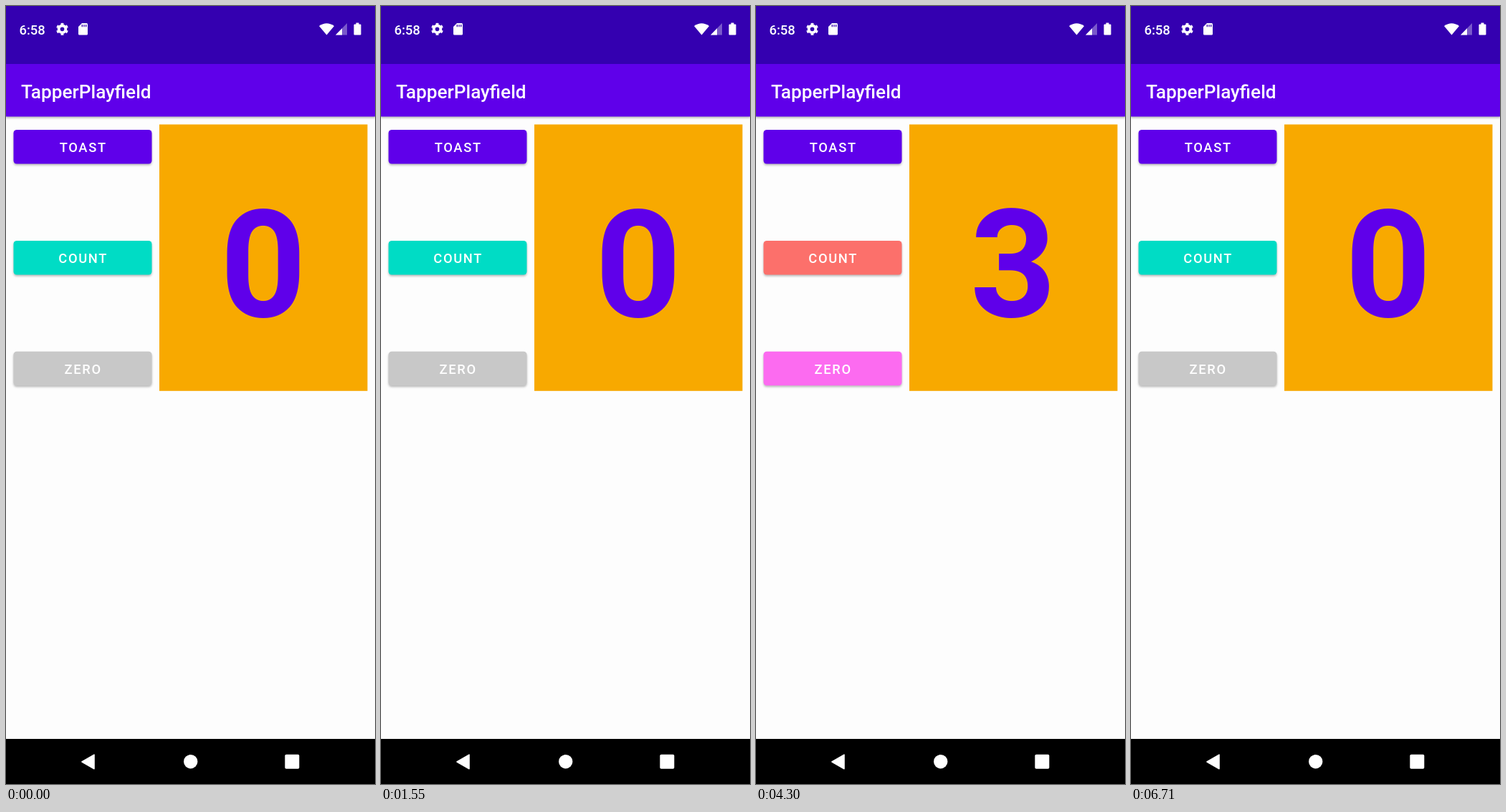
Recreate the animation shown at these times as an HTML page. Size 515 by 1087 pixels, loop 6870 ms.

```html
<!DOCTYPE html>
<html lang="en">
<head>
<meta charset="utf-8">
<title>Counter app</title>
<style>
  html, body { margin: 0; width: 100%; height: 100%; overflow: hidden; background: #fdfdfd; }
  svg { display: block; width: 515px; height: 1087px; }
  text { font-family: Roboto, sans-serif; font-weight: 500; fill: #fff; }
  .label { font-size: 18.36px; letter-spacing: .0893em; text-anchor: middle; }
  .raised { filter: drop-shadow(0 2px 1.5px #0004); }
</style>
</head>
<body>
<svg viewBox="0 0 515 1087">
  <rect width="515" height="1087" fill="#fdfdfd"/>
  <rect class="raised" y="70" width="515" height="84.5" fill="#5f00ea"/>
  <rect width="515" height="81" fill="#3400b0"/>

  <g id="status" fill="#fff">
    <text x="18.5" y="39.5" font-size="18.4">6:58</text>
    <g fill="none" stroke="#fff">
      <circle cx="78.5" cy="32.3" r="4.8" stroke-width="3.9"/>
      <circle cx="78.5" cy="32.3" r="7.2" stroke-width="2.6" pathLength="12" stroke-dasharray="1" stroke-dashoffset="-.5"/>
    </g>
    <path d="M106 24h6.500q1.500 0 1.500 1.500v13.500q0 1.500-1.500 1.500h-10q-1.500 0-1.500-1.500v-10z"/>
    <path d="M106.300 26v3.300M109 26v3.300M111.700 26v3.300" stroke="#3400b0" stroke-width="1.300"/>
    <path d="M437 28Q447.500 20.500 458 28L447.500 40.500z"/>
    <path d="M476 24v16.500h-16z" opacity=".35"/>
    <path d="M469 31.200v9.300h-9z"/>
    <path d="M488.500 23.500h4v2h2q1 0 1 1v13q0 1-1 1h-8q-1 0-1-1v-13q0-1 1-1h2z"/>
  </g>
  <text x="21" y="128.700" font-size="26.2">TapperPlayfield</text>

  <g id="buttons"></g>

  <rect x="214" y="165.500" width="290.500" height="372.300" fill="#f8a900"/>
  <text id="digit" x="359" y="434" font-size="209.8" text-anchor="middle" style="font-weight:700;fill:#5f00ea">0</text>

  <g id="toast">
    <rect x="179" y="928.500" width="157" height="64" rx="30" fill="#ededed"/>
    <text x="257.500" y="967.500" font-size="18.4" text-anchor="middle" style="font-weight:400;fill:#141414">Hello Toast</text>
  </g>

  <rect y="1024" width="515" height="63"/>
  <g fill="#fff">
    <path d="M106 1056l17-9.800v19.600z" stroke="#fff" stroke-width="1.600" stroke-linejoin="round"/>
    <circle cx="257.700" cy="1055.700" r="9.700"/>
    <rect x="389.300" y="1045.800" width="20" height="20" rx="1.800"/>
  </g>
</svg>
<script>
const LOOP = 6870;
const TOAST_PRESS = 1920, TOAST_SHOW = 2090, TOAST_HIDE = 4050, RESET = 6130;
const COUNTS = [3000, 3550, 4050, 4500, 5130];
const TEAL = '#00dcc5', CORAL = '#fc706b', GRAY = '#c8c8c8', PINK = '#fc6bf0';

const byId = id => document.getElementById(id);

function makeButton(label, y, color) {
  const g = document.createElementNS('http://www.w3.org/2000/svg', 'g');
  const box = `x="10.500" y="${y}" width="193" height="47.500" rx="4.500"`;
  g.innerHTML = `<rect class="raised" ${box} fill="${color}"/><rect ${box} fill="#fff"/>
    <text class="label" x="107.700" y="${y + 31.2}">${label}</text>`;
  byId('buttons').append(g);
  const [face, ripple] = g.children;
  return { face, ripple };
}

const toastButton = makeButton('TOAST', 173, '#5f00ea');
const countButton = makeButton('COUNT', 328, TEAL);
const zeroButton = makeButton('ZERO', 482.7, GRAY);

// White press highlight: held, then released in two steps.
function highlight(button, t, presses) {
  const age = t - presses.filter(p => p <= t).at(-1);
  button.ripple.setAttribute('opacity', age < 160 ? .19 : age < 250 ? .08 : 0);
}

function draw() {
  const t = performance.now() % LOOP;
  const count = t < RESET ? COUNTS.filter(c => c <= t).length : 0;

  byId('digit').textContent = count;
  countButton.face.setAttribute('fill', count % 2 ? CORAL : TEAL);
  zeroButton.face.setAttribute('fill', count ? PINK : GRAY);
  byId('toast').setAttribute('opacity', t >= TOAST_SHOW && t < TOAST_HIDE ? 1 : 0);

  highlight(toastButton, t, [TOAST_PRESS]);
  highlight(countButton, t, COUNTS);
  highlight(zeroButton, t, [RESET]);
  requestAnimationFrame(draw);
}
draw();
</script>
</body>
</html>
```
